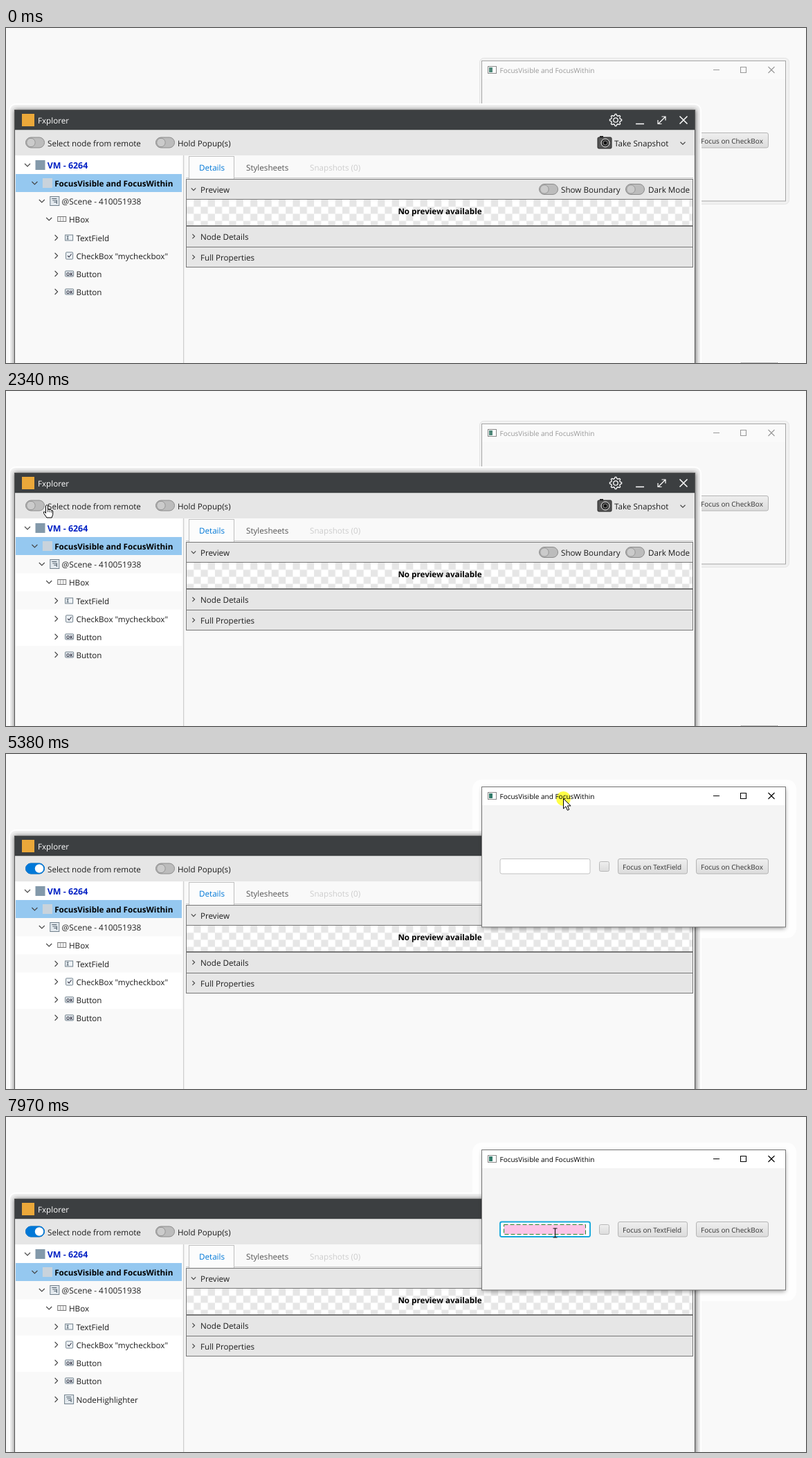
An HTML page for the animation above (8 s loop, 1156 px wide and 484 px high).

```html
<!DOCTYPE html>
<html lang="en">
<head>
<meta charset="utf-8">
<title>Node explorer</title>
<style>
  html, body { margin: 0; width: 100%; height: 100%; overflow: hidden; background: #f9f9f9; }
  svg { display: block; width: 100%; height: 100%; }
  text { font: 11.65px "Open Sans", "Noto Sans", sans-serif; text-rendering: geometricPrecision; white-space: pre; }
  .bold { font-weight: 700; }
  .small { font-size: 10px; }
</style>
</head>
<body>
<svg id="stage" viewBox="0 0 1156 484" xmlns="http://www.w3.org/2000/svg"></svg>
<script>
const LOOP = 8000;
const ROW = 26.25, ROW_TOP = 184.5;
const CHECK = 10.23;

// Cursor moves: start, end, number of steps, evenly timed way points.
const MOVES = [
  [760, 1540, 11, [[324, 414], [267, 371], [219, 362], [158, 310], [118, 255], [106, 233]]],
  [1630, 2340, 10, [[103, 227], [80, 195], [64, 174], [57, 164]]],
  [4130, 4840, 10, [[64, 160], [340, 110], [669, 85], [800, 73]]],
  [4990, 5230, 4, [[800, 72], [805, 64]]],
  [6020, 6160, 3, [[804, 68], [801, 84]]],
  [6860, 7470, 9, [[801, 90], [800, 115], [797, 138], [796, 159], [793, 166]]],
  [7880, 7970, 2, [[793, 166], [793, 167]]]
];
const CLICKS = [[3270, 3360], [5380, 5460]];
const CARET = [[5460, 5850], [6390, 6860], [7470, 7880]];

const attrs = o => Object.entries(o).map(([k, v]) => `${k}="${v}"`).join(' ');
const rect = (x, y, width, height, fill, more = {}) =>
  `<rect ${attrs({ x, y, width, height, fill, ...more })}/>`;
const text = (x, mid, label, fill = '#1c1c1c', cls = '', more = {}) =>
  `<text ${attrs({ x, y: mid + 4.5, fill, class: cls, ...more })}>${label}</text>`;
const path = (d, more = {}) =>
  `<path ${attrs({ d, fill: 'none', stroke: '#444', 'stroke-width': 1.1, ...more })}/>`;
const group = (id, body, more = {}) => `<g ${attrs({ id, ...more })}>${body}</g>`;
const down = (x, y, r = 4) => path(`M${x - r} ${y - r / 2}l${r} ${r}l${r} ${-r}`);
const right = (x, y, r = 4) => path(`M${x - r / 2} ${y - r}l${r} ${r}l${-r} ${r}`);

function toggle(x, y, on = false) {
  const style = on ? ['#0078d7', '#0078d7', x + 20, '#fff'] : ['#bcbcbc', '#8c8c8c', x + 8, '#cbcbcb'];
  return rect(x + .5, y - 7.5, 27, 15, style[0], { rx: 7.5, stroke: style[1] }) +
    `<circle cx="${style[2]}" cy="${y}" r="6.2" fill="${style[3]}" ${on ? '' : 'stroke="#969696"'}/>`;
}

function button(x, w, label) {
  return rect(x + .5, 151.5, w, 21.5, 'url(#face)', { rx: 2.5, stroke: '#b4b4b4' }) +
    text(x + 7, 162, label, '#333', 'small');
}

const icons = {
  block: color => (x, y) => rect(x - 7, y - 7, 14, 14, color),
  scene: (x, y) => rect(x - 6.5, y - 6.5, 13, 13, '#e3e9ee', { stroke: '#71808c' }) +
    path(`M${x - 4} ${y - 3.5}h7M${x - 3} ${y - 1}h6v5M${x - 1} ${y + 1.5}h4`, { stroke: '#52616d' }),
  box: (x, y) => rect(x - 6, y - 3.5, 12, 7, '#f4f4f4', { stroke: '#777' }) +
    path(`M${x - 2} ${y - 3}v6M${x + 2} ${y - 3}v6`, { stroke: '#aaa' }),
  field: (x, y) => rect(x - 5.5, y - 4, 11, 8, '#eef3f7', { stroke: '#71808c' }) +
    path(`M${x - 3.5} ${y - 2}h3M${x - 2} ${y - 2}v4M${x - 3.5} ${y + 2}h3`, { stroke: '#52616d' }),
  check: (x, y) => rect(x - 4.5, y - 5, 10, 10, '#eef3f7', { stroke: '#71808c', rx: 1 }) +
    path(`M${x - 2} ${y}l2 2l3.5 -4.5`, { stroke: '#334' }),
  ok: (x, y) => rect(x - 5.5, y - 4, 12, 8, '#e3e9ee', { stroke: '#71808c', rx: 1 }) +
    text(x - 4, y - 2, 'OK', '#334', 'bold', { style: 'font-size:6.5px' })
};

const TREE = [
  ['VM - 6264', 0, icons.block('#8399aa'), '#0020c4', 'bold', { style: 'font-size:12.4px' }],
  ['FocusVisible and FocusWithin', 1, icons.block('#c9d3dc'), '#000', 'bold'],
  ['@Scene - 410051938', 2, icons.scene, '#222', '', { style: 'font-size:11.9px' }],
  ['HBox', 3, icons.box],
  ['TextField', 4, icons.field],
  ['CheckBox "mycheckbox"', 4, icons.check],
  ['Button', 4, icons.ok],
  ['Button', 4, icons.ok],
  ['NodeHighlighter', 4, icons.scene]
];

function treeRow([label, depth, icon, ...style], i) {
  const y = Math.round(ROW_TOP + ROW * (i + .5)), x = 31 + depth * 10.4;
  const body = (depth < 4 ? down : right)(x, y) + icon(x + 18.5, y) + text(x + 28.8, y, label, ...style);
  return group('row' + i, body);
}

const whiteRow = i => rect(14, ROW_TOP + ROW * i, 240, ROW, '#fff');

function gear(x, y) {
  const points = Array.from({ length: 32 }, (_, i) => {
    const r = i % 4 < 2 ? 8.6 : 6.6, a = (i - .5) * Math.PI / 16;
    return `${(x + r * Math.cos(a)).toFixed(1)},${(y + r * Math.sin(a)).toFixed(1)}`;
  });
  return `<polygon points="${points.join(' ')}" fill="none" stroke="#fff" stroke-width="1.3"/>
    <circle cx="${x}" cy="${y}" r="3.2" fill="none" stroke="#fff" stroke-width="1.3"/>`;
}

function camera(x, y) {
  return rect(x - 10, y - 7, 20, 16, '#555', { rx: 1.5, stroke: '#222' }) + rect(x - 7, y - 9, 5, 2, '#222') +
    `<circle cx="${x + 1}" cy="${y + 1}" r="6" fill="#333" stroke="#eee"/>
     <circle cx="${x + 1}" cy="${y + 1}" r="3" fill="#111" stroke="#888"/>`;
}

function pane(y, h, label, open) {
  return rect(260.5, y + .5, 732, h, '#e6e6e6', { stroke: '#777' }) +
    (open ? down : right)(271, y + 15, 3.2) + text(281, y + 15, label);
}

function explorer() {
  const white = { stroke: '#fff', 'stroke-width': 1.5 };
  return rect(5, 110, 999, 390, '#f1f1f1', { rx: 9, stroke: '#fff', 'stroke-width': 2 }) +
    rect(12, 118, 985, 400, '#000', { opacity: .55, filter: 'url(#blur)' }) +
    rect(12.5, 118.5, 983, 380, '#f9f9f9', { stroke: '#555' }) +
    rect(13, 119, 982, 28.5, '#3c3f41') + rect(13, 147.5, 982, 36.5, '#e6e6e6') +
    rect(23, 124, 18, 18, '#eba83a') + text(46, 133, 'Fxplorer', '#fff') +
    gear(881, 133) + path('M910 138.5h12M973.5 127.5l11 11m0 -11l-11 11', white) +
    path('M942.5 138.5l10 -10M947.5 128h5.5v5.5M942 133v5.5h5.5', { ...white, 'stroke-width': 1.2 }) +
    toggle(28, 165.5) + group('switchOn', toggle(28, 165.5, true)) + text(60, 166, 'Select node from remote') +
    toggle(216, 165.5) + text(248, 166, 'Hold Popup(s)') +
    camera(865, 165) + text(879, 166, 'Take Snapshot') + down(978, 166.5, 3.5) +
    whiteRow(0) + group('whiteRows', [3, 5, 6].map(whiteRow).join('')) +
    rect(14, 211, 240, 26, '#95c8f0', { id: 'selected' }) + TREE.map(treeRow).join('') +
    rect(256, 184, 1.3, 300, '#cfcfcf') +
    path('M260 216.5H993', { stroke: '#c8c8c8' }) +
    rect(264.5, 185.5, 65, 32, '#fcfcfc', { stroke: '#c0c0c0' }) +
    rect(265, 216, 64, 2, '#fcfcfc') +
    text(279, 201.5, 'Details', '#0078d7') + text(347, 201.5, 'Stylesheets', '#555') +
    text(439, 201.5, 'Snapshots (0)', '#cdcdcd') +
    pane(218, 29, 'Preview', true) +
    toggle(770, 233) + text(802, 233, 'Show Boundary') + toggle(895, 233) + text(928, 233, 'Dark Mode') +
    rect(260.5, 247.5, 732, 38, 'url(#checker)', { stroke: '#777' }) +
    text(627, 264.5, 'No preview available', '#000', 'bold', { 'text-anchor': 'middle' }) +
    pane(286, 30, 'Node Details') + pane(316, 29, 'Full Properties');
}

function remote(id, active) {
  const ink = active ? '#000' : '#999';
  const shadow = active
    ? rect(689, 50, 437, 202, '#000', { opacity: .4, filter: 'url(#blur)' })
    : rect(684.5, 43.5, 447, 211, '#f1f1f1', { rx: 6, stroke: '#e4e4e4' });
  const overlay = { stroke: '#26852c', 'stroke-dasharray': '6 3', 'fill-opacity': .45 };
  return group(id, shadow +
    rect(687.5, 47.5, 439, 202.5, active ? '#f4f4f4' : '#f8f8f8', { stroke: active ? '#777' : '#a5a5a5' }) +
    rect(688, 48, 438, 26, active ? '#fff' : '#fafafa') +
    rect(696.5, 55.5, 12, 10, '#fff', { stroke: '#888' }) + rect(698, 57, 5, 7, active ? '#347c6c' : '#4f8779') +
    text(713.5, 60.5, 'FocusVisible and FocusWithin', ink, 'small') +
    path('M1022 60.5h9M1061.5 56.5h8v8h-8zM1101.5 56l9 9m0 -9l-9 9', { stroke: ink }) +
    rect(714, 151.5, 130, 21.5, '#fff', { rx: 2.5, stroke: '#c2c2c2' }) +
    (active ? rect(714, 151.5, 130, 21.5, '#fff', { id: 'focusRing', rx: 2.5, stroke: '#16a9dd', 'stroke-width': 1.9 }) +
      rect(720.5, 155, 1, 15, '#222', { id: 'caret' }) : '') +
    rect(857.5, 155.5, 14, 14, 'url(#face)', { rx: 2, stroke: '#b8b8b8' }) +
    button(884, 100, 'Focus on TextField') + button(997, 104, 'Focus on CheckBox') +
    rect(688.5, 74.5, 437.5, 175, '#fa7cc8', { ...overlay, id: id + 'Pink' }) +
    (active ? rect(719.5, 155.5, 118, 14, '#fa7cc8', { ...overlay, id: 'fieldPink' }) : ''));
}

const cursors = {
  arrow: path('M0 0V14.5L3.4 11.3L5.8 16.8L8.2 15.8L5.9 10.4H10.6Z', { fill: '#fff', stroke: '#000', 'stroke-width': 1 }),
  hand: path('M0 1.2Q1.5 -1 3 1.2V7Q4.5 5.6 5.6 7.2Q7.2 6.2 8.2 8Q10 7.4 10.2 9.5V14L8.6 18.5H1.4L-3 12Q-3.6 9.6 -1.7 10L0 12Z',
    { fill: '#fff', stroke: '#000', 'stroke-width': 1 }) + path('M3 7v3.5M5.6 8v2.8M8.2 8.6v2.6'),
  cross: path('M-8.5 .5h18M.5 -8.5v18', { 'stroke-dasharray': '1.5 1.5 1.5 .5 3 3 1 0' }),
  beam: path('M-3 -6.5h2.5l.5 .5l.5 -.5H3M0 -6V6M-3 6.5h2.5l.5 -.5l.5 .5H3', { stroke: '#111' })
};

const stage = document.getElementById('stage');
stage.innerHTML = `<defs>
    <filter id="blur" x="-5%" y="-10%" width="110%" height="120%"><feGaussianBlur stdDeviation="3"/></filter>
    <linearGradient id="face" x2="0" y2="1"><stop stop-color="#efefef"/><stop offset="1" stop-color="#dcdcdc"/></linearGradient>
    <pattern id="checker" x="261" y="248" width="${2 * CHECK}" height="${2 * CHECK}" patternUnits="userSpaceOnUse">
      ${rect(0, 0, 2 * CHECK, 2 * CHECK, '#fff')}${rect(CHECK, 0, CHECK, CHECK, '#e6e6e6')}
      ${rect(0, CHECK, CHECK, CHECK, '#e6e6e6')}</pattern>
  </defs>` +
  rect(0, 0, 1156, 484, '#f9f9f9') +
  path('M1062 483.5h54', { id: 'dots', stroke: '#888', 'stroke-dasharray': '1 1' }) +
  rect(674, 37, 468, 229, '#fff', { id: 'halo', rx: 14, opacity: .85 }) +
  remote('back', false) + explorer() + remote('front', true) +
  group('pointer', '<circle id="press" r="10.5" fill="#ffff46" style="mix-blend-mode:multiply"/>' +
    Object.entries(cursors).map(([id, shape]) => group(id, shape)).join(''));

const el = id => document.getElementById(id);
const show = (id, on) => { el(id).style.display = on ? '' : 'none'; };
const within = (t, spans) => spans.some(([a, b]) => t >= a && t < b);
const inside = ([x, y], l, t, r, b) => x >= l && x < r && y >= t && y < b;

function pointerAt(t) {
  const move = MOVES.filter(m => t >= m[0]).pop();
  if (!move) return null;
  const [start, end, steps, points] = move;
  const step = Math.min(steps - 1, Math.floor((t - start) / (end - start) * (steps - 1) + .25));
  const at = step / (steps - 1) * (points.length - 1);
  const i = Math.min(points.length - 2, Math.floor(at));
  return points[i].map((v, axis) => Math.round(v + (points[i + 1][axis] - v) * (at - i)));
}

function draw(t) {
  const pos = pointerAt(t), p = pos || [-99, -99];
  const front = t >= 5380;
  const overExplorer = inside(p, 12, 118, 996, 484) && !(front && inside(p, 688, 48, 1127, 250));
  const overRemote = !overExplorer && inside(p, 688, 48, 1127, 250);
  const overScene = overRemote && p[1] >= 74;
  const overField = front && inside(p, 714, 151, 845, 174);
  const overSwitch = inside(p, 28, 156, 196, 176);
  const kind = overField ? 'beam' : overSwitch ? 'hand' : overExplorer || overRemote ? 'arrow' : 'cross';

  show('back', !front);
  show('front', front);
  show('halo', front);
  show('backPink', overScene);
  show('frontPink', overScene && !overField);
  show('fieldPink', overField);
  show('row8', overScene);
  show('focusRing', t >= 5460);
  show('caret', within(t, CARET));
  show('switchOn', t >= 3360);
  show('whiteRows', t >= 1150);
  show('dots', t < 3270);
  el('selected').setAttribute('fill', inside(p, 14, 211, 254, 237) ? '#70b4e9' : '#95c8f0');

  show('pointer', pos);
  show('press', within(t, CLICKS));
  for (const id in cursors) show(id, id === kind);
  el('pointer').setAttribute('transform', `translate(${p[0] + .5} ${p[1] + .5})`);
}

function tick() {
  draw(performance.now() % LOOP);
  requestAnimationFrame(tick);
}
tick();
</script>
</body>
</html>
```
